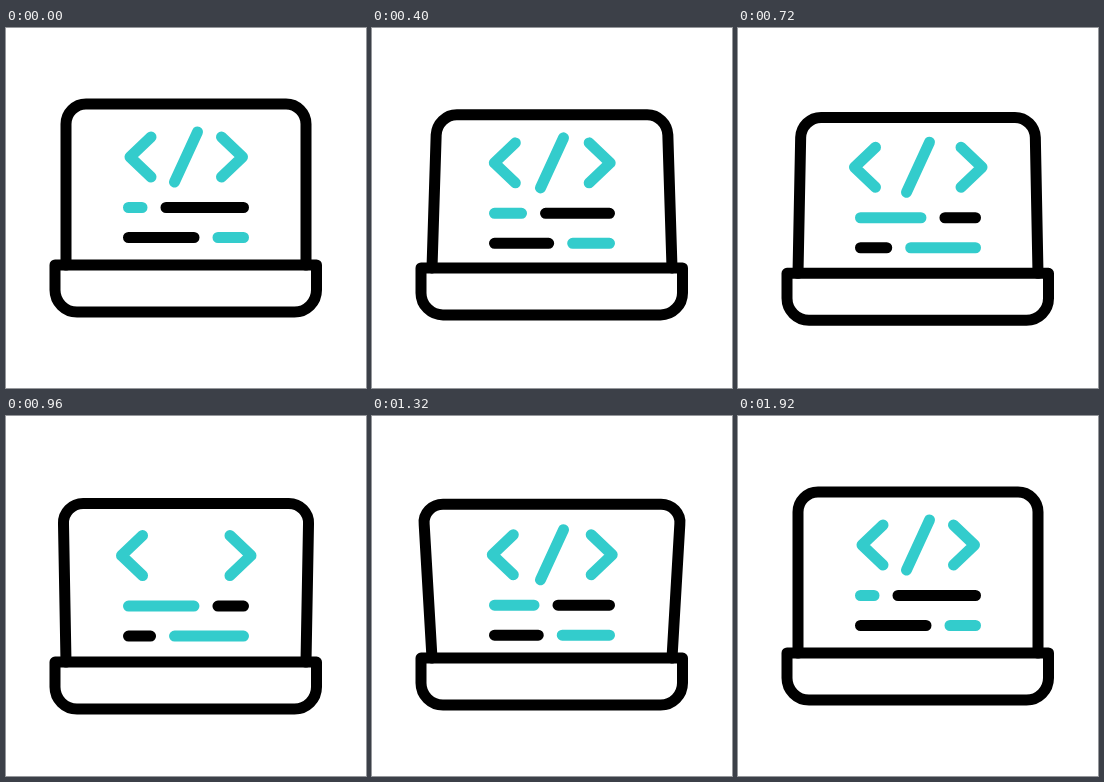
An HTML page that plays this animation: 360 by 360 pixels, repeating every 2 s.

```html
<!DOCTYPE html>
<html lang="en">
<head>
<meta charset="utf-8">
<title>Coding laptop</title>
<style>
html, body { margin: 0; width: 100%; height: 100%; overflow: hidden; background: #fff; }
svg { display: block; width: 100vw; height: 100vh; }
path { fill: none; stroke: #000; stroke-width: 11; stroke-linecap: round; stroke-linejoin: round; }
.teal { stroke: #3cc; }
</style>
</head>
<body>
<svg viewBox="0 0 360 360">
  <path id="lid"/>
  <path id="base" d="M49 237H310.5V262a22 22 0 0 1-22 22H71a22 22 0 0 1-22-22z"/>
  <g id="code">
    <path id="left" class="teal" d="M145 109l-21 20 21 20"/>
    <path id="right" class="teal" d="M215.5 109l21 20-21 20"/>
    <path id="slash" class="teal" d="M191.5 104l-23 50"/>
    <path id="dark"/>
    <path id="bright" class="teal"/>
  </g>
</svg>
<script>
const LOOP = 2000, STEP = 40;
const el = id => document.getElementById(id);
const move = (id, x, y) => el(id).setAttribute('transform', `translate(${x} ${y})`);
const draw = (id, d) => el(id).setAttribute('d', d);
const part = (t, a, b) => Math.min(1, Math.max(0, (t - a) / (b - a)));
const smooth = u => u * u * (3 - 2 * u);
const smoother = u => u * u * u * (u * (6 * u - 15) + 10);

// Eased value through [time, value] points
function track(t, points) {
  let value = points[0][1];
  for (let i = 1; i < points.length; i++) {
    const [a, from] = points[i - 1], [b, to] = points[i];
    value += (to - from) * smooth(part(t, a, b));
  }
  return value;
}

function render(t) {
  const p = smoother(part(t, 100, 920)) - smoother(part(t, 920, 1720));
  const drop = 9.1 * Math.max(0, p) ** 0.85;
  const tilt = track(t, [[80, 0], [500, 5.6], [1330, -9], [1640, 0]]);
  const away = Math.max(0, tilt), toward = Math.max(0, -tilt);

  const foot = 237 + drop;
  const top = 76 + drop + 1.65 * away + 0.8 * toward;
  const l = 60 + tilt, r = 300 - tilt;
  const bend = 20 / (foot - top) * tilt;
  draw('lid', `M60 ${foot}L${l - bend} ${top + 20}C${l} ${top + 9} ${l + 9} ${top} ${l + 20} ${top}` +
    `H${r - 20}C${r - 9} ${top} ${r} ${top + 9} ${r + bend} ${top + 20}L300 ${foot}`);
  move('base', 0, drop);

  move('code', 0, drop + 0.62 * away + 0.52 * toward);
  const spread = 8.5 * Math.max(0, p) ** 1.2;
  move('left', -spread, 0);
  move('right', spread, 0);
  el('slash').style.display = t >= 840 && t < 1120 ? 'none' : '';

  const a = 136 + 52 * p, b = 188 - 43.5 * p;
  draw('bright', `M122.5 179.5H${a}M${b + 24} 209.5H237.5`);
  draw('dark', `M${a + 24} 179.5H237.5M122.5 209.5H${b}`);
}

const start = performance.now();
function tick() {
  const t = (performance.now() - start) % LOOP;
  render(Math.floor(t / STEP) * STEP);
  requestAnimationFrame(tick);
}
tick();
</script>
</body>
</html>
```
